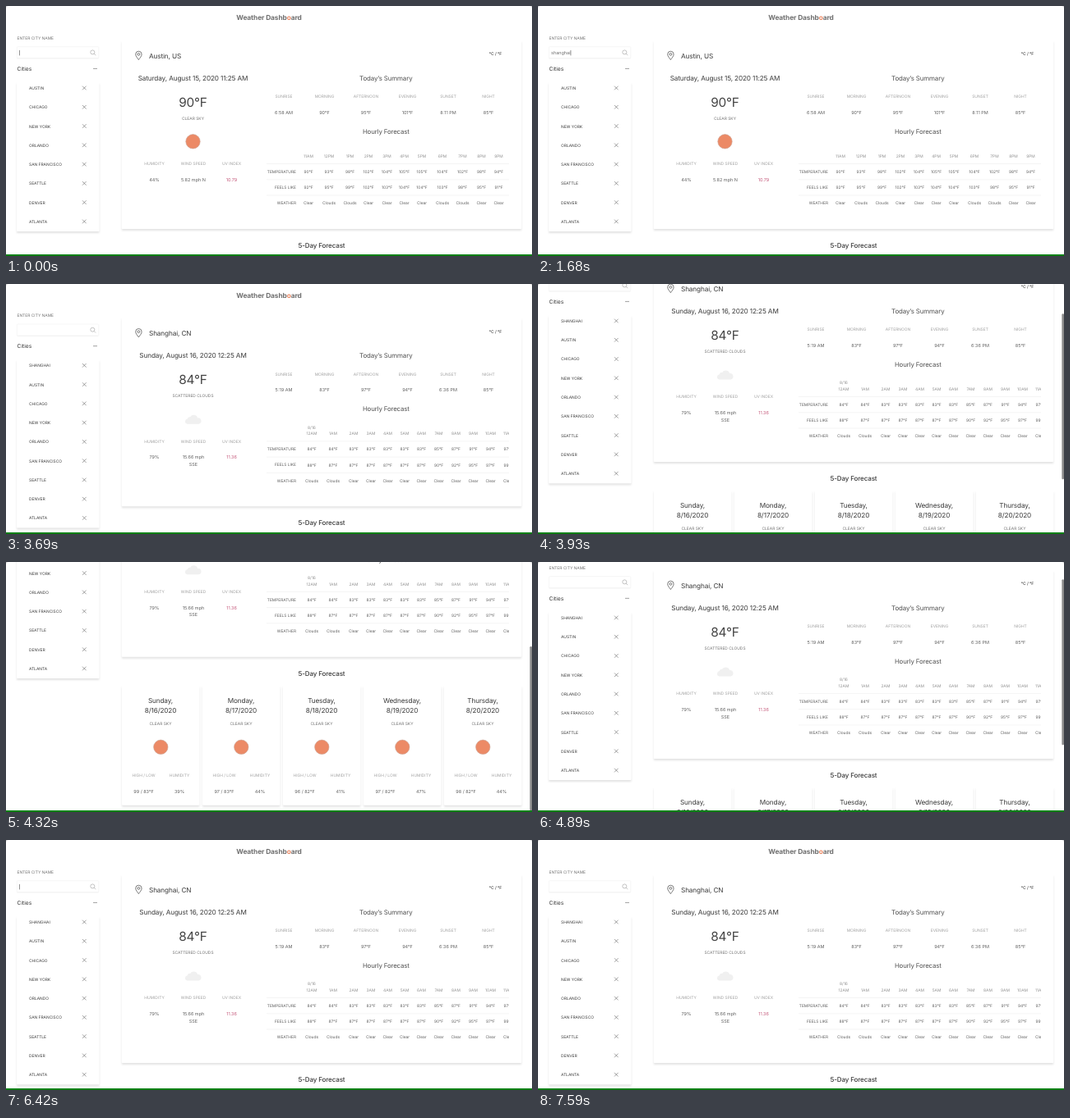
An HTML page that plays this animation: 640x305 px, repeating every 7.62 s.

```html
<!DOCTYPE html>
<html lang="en">
<head>
<meta charset="utf-8">
<title>Weather Dashboard</title>
<style>
  html, body { margin: 0; width: 100%; height: 100%; overflow: hidden; background: #fff; }
  svg { display: block; width: 640px; height: 305px; font-family: Inter, "Open Sans", sans-serif;
    text-rendering: geometricPrecision; }
  .card { fill: #fff; filter: drop-shadow(0 2px 1.2px rgba(0, 0, 0, .11)); }
  .line { fill: none; stroke: #777; stroke-width: .7; }
  .faint { stroke: #aaa; }
  .dark { stroke: #444; }
  .rule { stroke: #ededed; stroke-width: .6; }
</style>
</head>
<body>
<svg id="stage" viewBox="0 0 640 305"></svg>
<script>
const LOOP = 7620, MAX_SCROLL = 156.3;
const DARK = '#3a3a3a', MID = '#606060', PALE = '#a0a0a0', RED = '#c4587a', ORANGE = '#ec8a66';

// Text is placed by the vertical middle of its capitals; larger sizes are set tighter.
const text = (str, x, y, size, fill = MID, anchor = 'middle', weight = 400) =>
  `<text x="${x}" y="${(y + size * .364).toFixed(2)}" font-size="${size}" fill="${fill}" ` +
  `text-anchor="${anchor}" font-weight="${weight}" letter-spacing="${size > 7 ? '-.015em' : 0}">${str}</text>`;
const label = (str, x, y, fill = PALE) => text(str, x, y, 4.9, fill);
const value = (str, x, y, fill = MID) => text(str, x, y, 5.5, fill);
const card = (x, y, w, h) => `<rect class="card" x="${x}" y="${y}" width="${w}" height="${h}" rx="1"/>`;
const rule = (x1, x2, y) => `<path class="rule" d="M${x1} ${y}H${x2}"/>`;
const sun = (x, y) => `<circle cx="${x}" cy="${y}" r="8.7" fill="${ORANGE}" stroke="#c9a090" stroke-width=".6"/>`;
const cloud = `<path fill="#f0f0f0" d="M220.5 171.500a3.200 3.200 0 0 1 .2-6.300 3.200 3.200 0 0 1 3.400-2.300
  5 5 0 0 1 9.100 1.200 3.800 3.800 0 0 1 1.600 7.400z"/>`.replace(/00\b/g, '');

const cities = ['AUSTIN', 'CHICAGO', 'NEW YORK', 'ORLANDO', 'SAN FRANCISCO', 'SEATTLE', 'DENVER', 'ATLANTA'];

const cityList = names => card(13, 93, 100.5, names.length * 23.3 - 4.5) + names.map((name, i) => {
  const y = 100.2 + i * 23.27;
  return text(name, 28, y, 4.9, DARK, 'start') +
    `<path class="line" d="M93 ${y - 2.5}l4.6 4.6m0-4.6l-4.6 4.6"/>`;
}).join('');

const reports = {
  austin: {
    place: 'Austin, US', date: 'Saturday, August 15, 2020 11:25 AM', temp: '90°F', sky: 'CLEAR SKY',
    icon: sun(227.5, 165.3), humidity: '44%', wind: ['5.82 mph N'], uv: '10.79',
    summary: ['6:58 AM', '90°F', '95°F', '101°F', '8:11 PM', '85°F'],
    columns: [368, 393, 418.5, 441, 463.5, 484.5, 506, 531, 555.5, 578.5, 599.5], firstHour: 11,
    temps: [90, 93, 98, 102, 104, 105, 105, 104, 102, 98, 94],
    feels: [92, 95, 99, 102, 103, 104, 104, 103, 98, 95, 91], cloudy: [1, 2, 7, 8]
  },
  shanghai: {
    place: 'Shanghai, CN', date: 'Sunday, August 16, 2020 12:25 AM', temp: '84°F', sky: 'SCATTERED CLOUDS',
    icon: cloud, humidity: '79%', wind: ['15.66 mph', 'SSE'], uv: '11.36',
    summary: ['5:19 AM', '83°F', '97°F', '94°F', '6:36 PM', '85°F'],
    columns: [372, 398, 423, 444, 464.5, 485, 505.5, 526.5, 547.5, 568.5, 589.5, 611], firstHour: 0, day: '8/16',
    temps: [84, 84, 83, 83, 83, 83, 83, 85, 87, 91, 94, 97],
    feels: [88, 87, 87, 87, 87, 87, 87, 90, 92, 95, 97, 99], cloudy: [0, 1]
  }
};

const summaryX = [338, 387.5, 438, 488.5, 538, 587];
const summaryNames = ['SUNRISE', 'MORNING', 'AFTERNOON', 'EVENING', 'SUNSET', 'NIGHT'];
const hourName = h => (h % 12 || 12) + (h < 12 ? 'AM' : 'PM');

function report(r) {
  const hours = r.columns.map((x, i) =>
    label(hourName((r.firstHour + i) % 24), x, 183, '#909090') +
    label(r.temps[i] + '°F', x, 202.2, MID) +
    label(r.feels[i] + '°F', x, 221.5, MID) +
    label(r.cloudy.includes(i) ? 'Clouds' : 'Clear', x, 240.5, MID)).join('');
  return text(r.place, 174, 60.8, 8.2, DARK, 'start') +
    text(r.date, 227.5, 88, 8.2, DARK) +
    text(r.temp, 227.5, 117.3, 15.4, '#444') +
    label(r.sky, 227.5, 137, '#707070') + r.icon +
    value(r.humidity, 180.5, 212.2) +
    r.wind.map((w, i) => value(w, 228, 212.2 + i * 8.5)).join('') +
    value(r.uv, 274.5, 212.2, RED) +
    r.summary.map((v, i) => value(v, summaryX[i], 130.2)).join('') +
    (r.day ? label(r.day, r.columns[0], 175.5, '#909090') : '') +
    `<g clip-path="url(#table)">${hours}</g>`;
}

const forecast = [['Sunday', 99, 83, 39], ['Monday', 97, 83, 44], ['Tuesday', 96, 82, 41],
  ['Wednesday', 97, 82, 47], ['Thursday', 98, 82, 44]];

const dayCard = ([day, high, low, humidity], i) => {
  const x = 188 + i * 98;
  return card(x - 47, 307, 94.5, 146) +
    text(day + ',', x, 324.8, 8.2, DARK) + text(`8/${16 + i}/2020`, x, 336.8, 8.2, DARK) +
    label('CLEAR SKY', x, 353.3, '#707070') + sun(x + .3, 382) +
    label('HIGH / LOW', x - 20.5, 416.3) + label('HUMIDITY', x + 23, 416.3) +
    value(`${high} / ${low}°F`, x - 20.5, 435.8) + value(humidity + '%', x + 23, 435.8);
};

const sidebar =
  text('ENTER CITY NAME', 13.5, 39.2, 4.9, '#707070', 'start') +
  `<rect x="13.3" y="49.7" width="99.5" height="14.2" rx="1" fill="#fff" stroke="#f3f3f3" stroke-width=".7"/>
  <path class="rule" d="M13.5 63.9h99"/>
  <circle class="line faint" cx="105.3" cy="56.4" r="2.5"/>
  <path class="line faint" d="M107.1 58.2l2 2"/>
  <text id="typed" x="16" y="59.2" font-size="5.5" fill="#707070"></text>
  <rect id="cursor" y="54" width=".7" height="6.4" fill="#666"/>` +
  text('Cities', 13.5, 76.3, 6.7, DARK, 'start') +
  `<path class="line" d="M106 76.4h5"/>
  <g id="shortList">${cityList(cities)}</g>
  <g id="longList">${cityList(['SHANGHAI', ...cities])}</g>`;

const panel = card(140.8, 42, 486.4, 230) +
  `<path class="line dark" d="M161.4 65.6c-2-2.8-3.7-4.6-3.7-6.7a3.7 3.7 0 0 1 7.4 0c0 2.1-1.7 3.9-3.7 6.7z"/>
  <circle class="line dark" cx="161.4" cy="58.9" r="1.4"/>` +
  text('°C / °F', 595.5, 58.5, 5, DARK, 'middle', 500) +
  label('HUMIDITY', 180.5, 192.6) + label('WIND SPEED', 228, 192.6) + label('UV INDEX', 274.5, 192.6) +
  text('Today’s Summary', 462.3, 88, 7.9, '#505050') +
  summaryNames.map((name, i) => label(name, summaryX[i], 110.6)).join('') +
  text('Hourly Forecast', 462.3, 153.2, 7.8, '#505050') +
  [192.5, 211.8, 231].map(y => rule(317, 612, y)).join('') +
  ['TEMPERATURE', 'FEELS LIKE', 'WEATHER'].map((name, i) =>
    text(name, 353, 202.2 + i * 19.2, 4.85, MID, 'end')).join('') +
  Object.keys(reports).map(key => `<g id="${key}">${report(reports[key])}</g>`).join('');

const $ = id => document.getElementById(id);
$('stage').innerHTML =
  `<clipPath id="table"><rect x="310" y="165" width="302" height="90"/></clipPath>
  <g id="page">` +
  text(`Weather Dashb<tspan fill="${ORANGE}">o</tspan>ard`, 320, 14.3, 8.4, '#707070', 'middle', 700) +
  sidebar + panel +
  text('5-Day Forecast', 384, 292, 8, DARK, 'middle', 500) +
  forecast.map(dayCard).join('') +
  `</g>
  <rect id="thumb" x="637.4" width="2.6" rx="1.2" fill="#8a8a8a"/>
  <path d="M0 0H3Q0 0 0 3zM640 0h-3q3 0 3 3z" fill="#ccc"/>
  <rect y="303" width="640" height="2" fill="#0a8016"/>`;

const ramp = (t, from, to) => Math.min(1, Math.max(0, (t - from) / (to - from)));
const smooth = u => u * u * (3 - 2 * u);
const show = (id, on) => $(id).setAttribute('visibility', on ? 'visible' : 'hidden');

// Down, back up, then a small elastic overshoot at the top.
function scrollAt(t) {
  const x = Math.max(0, t - 5040) / 110;
  const bounce = t < 5800 ? 3.7 * x * Math.exp(1 - x) : 0;
  return MAX_SCROLL * (smooth(ramp(t, 3665, 4330)) - smooth(ramp(t, 4480, 5060))) - bounce;
}

const cursorOn = [[0, 270], [450, 1230], [1680, 2250], [2790, 3240], [5520, 5970], [6420, 6900]];

function draw(t) {
  const submitted = t >= 1800, loaded = t >= 2220;
  const letters = t < 450 || submitted ? 0 : Math.min(8, 1 + Math.floor((t - 450) / 94));
  const typed = $('typed');
  typed.textContent = 'shanghai'.slice(0, letters);
  $('cursor').setAttribute('x', 16 + (letters ? typed.getComputedTextLength() : 0));
  show('cursor', cursorOn.some(([from, to]) => t >= from && t < to));
  show('shortList', !submitted);
  show('longList', submitted);
  show('austin', !loaded);
  show('shanghai', loaded);

  const scroll = scrollAt(t);
  $('page').setAttribute('transform', `translate(0 ${-scroll})`);
  const thumb = $('thumb');
  thumb.setAttribute('y', Math.max(0, scroll) / MAX_SCROLL * 103);
  thumb.setAttribute('height', 202 + Math.min(0, scroll) / 2);
  thumb.setAttribute('opacity', ramp(t, 3690, 3750) * (1 - ramp(t, 5550, 5790)));
}

const start = performance.now();
function tick() {
  draw((performance.now() - start) % LOOP);
  requestAnimationFrame(tick);
}
tick();
</script>
</body>
</html>
```
